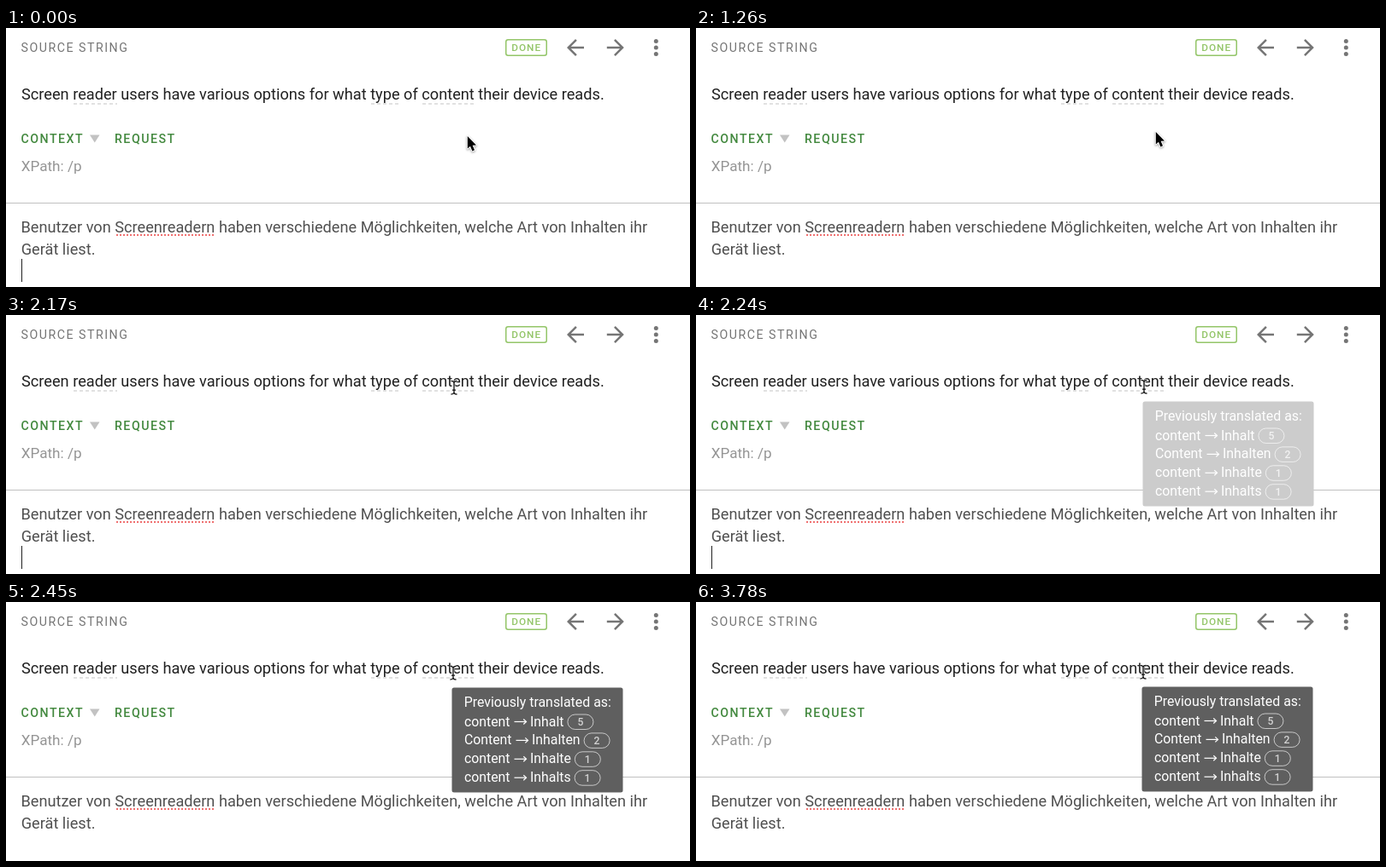
An HTML page with a canvas that plays this animation: 800x304 px, repeating every 3850 ms.

```html
<!DOCTYPE html>
<html lang="en">
<head>
<meta charset="utf-8">
<title>Translation editor</title>
<style>
  html, body { margin: 0; width: 100%; height: 100%; overflow: hidden; background: #fff; }
  canvas { display: block; width: 800px; height: 304px; }
</style>
</head>
<body>
<canvas id="stage"></canvas>
<script>
const W = 800, H = 304, LOOP = 3850, STEP = 70;
const canvas = document.getElementById('stage');
const ctx = canvas.getContext('2d');
const dpr = window.devicePixelRatio || 1;
canvas.width = W * dpr;
canvas.height = H * dpr;

const FAMILY = 'Roboto, "Noto Sans", sans-serif';
const GREEN = '#43893f', LIME = '#93c568', GREY = '#757575';
const back = new Path2D('M20 11H7.83l5.59-5.59L12 4l-8 8 8 8 1.41-1.41L7.83 13H20v-2z');

// Pointer: time, x, y
const track = [
  [0, 539, 126], [1120, 539, 126], [1260, 537, 121], [1820, 528, 97],
  [2030, 525, 89], [2240, 524, 85], [2380, 523, 84], [3710, 523, 84], [3780, 523, 83]
];
const BEAM_FROM = 2030, TIP_FROM = 2170, TIP_FADE = 220;
const BLINK = 530, BLINK_OFFSET = 360;

const tipRows = [
  ['content', 'Inhalt', '5'], ['Content', 'Inhalten', '2'],
  ['content', 'Inhalte', '1'], ['content', 'Inhalts', '1']
];

function text(str, x, y, size, color, weight = 400, spacing = 0) {
  ctx.font = `${weight} ${size}px ${FAMILY}`;
  ctx.letterSpacing = spacing + 'px';
  ctx.fillStyle = color;
  ctx.fillText(str, x, y);
  return x + ctx.measureText(str).width;
}

function line(x1, y1, x2, y2, color, width = 1, dash = []) {
  ctx.strokeStyle = color;
  ctx.lineWidth = width;
  ctx.setLineDash(dash);
  ctx.beginPath();
  ctx.moveTo(x1, y1);
  ctx.lineTo(x2, y2);
  ctx.stroke();
  ctx.setLineDash([]);
}

function roundBox(x, y, w, h, r) {
  ctx.beginPath();
  ctx.roundRect(x, y, w, h, r);
}

function poly(points) {
  ctx.beginPath();
  points.forEach(([x, y]) => ctx.lineTo(x, y));
  ctx.closePath();
}

function arrowIcon(cx, cy, dir) {
  ctx.save();
  ctx.translate(cx, cy);
  ctx.scale(1.25 * dir, 1.25);
  ctx.translate(-12, -12);
  ctx.fillStyle = GREY;
  ctx.fill(back);
  ctx.restore();
}

function drawHeader() {
  text('SOURCE STRING', 17.6, 28, 14.2, GREY, 400, 1.5);
  roundBox(584.75, 13.75, 47.5, 18.5, 2.5);
  ctx.strokeStyle = LIME;
  ctx.lineWidth = 1.5;
  ctx.stroke();
  text('DONE', 591.2, 27, 11.8, LIME, 500, 1);
  arrowIcon(666, 23, 1);
  arrowIcon(712.8, 23, -1);
  ctx.fillStyle = GREY;
  for (const y of [15.5, 23, 30.5]) {
    ctx.beginPath();
    ctx.arc(760.3, y, 2.5, 0, Math.PI * 2);
    ctx.fill();
  }
}

function drawBody() {
  text('Screen reader users have various options for what type of content their device reads.',
    18, 83.5, 18.2, '#212121');
  for (const [a, b] of [[79, 130], [427, 461], [487, 548]])
    line(a, 89, b, 89, '#c4c4c4', 1.2, [4, 3]);

  text('CONTEXT', 17.5, 134.5, 14.2, GREEN, 500, 1.5);
  text('REQUEST', 127, 134.5, 14.2, GREEN, 500, 1.5);
  poly([[98, 125.5], [109.5, 125.5], [103.75, 134.5]]);
  ctx.fillStyle = '#c2c2c2';
  ctx.fill();
  text('XPath: /p', 17.8, 168, 17.1, '#949494');

  line(0, 205.5, W, 205.5, '#c0c0c0');
  text('Benutzer von Screenreadern haben verschiedene Möglichkeiten, welche Art von Inhalten ihr',
    17.5, 239.5, 18.18, '#505050');
  text('Gerät liest.', 17.7, 266, 18.18, '#505050');
  line(129, 243, 244, 243, '#f07070', 2, [2, 2]);
}

function drawTip(x, y, shade) {
  const grey = 255 - 160 * shade;
  ctx.save();
  ctx.translate(x, y);
  roundBox(0, 0, 200, 123, 2.5);
  ctx.fillStyle = `rgb(${grey}, ${grey}, ${grey})`;
  ctx.fill();
  text('Previously translated as:', 14.2, 22.5, 15.9, '#fff');
  tipRows.forEach(([from, to, count], i) => {
    const base = 45 + i * 21.9, mid = base - 5;
    const end = text(from, 14.4, base, 15.85, '#fff');
    const a = end + 5, b = a + 14;
    line(a, mid, b, mid, '#fff', 1.2);
    ctx.beginPath();
    ctx.moveTo(b - 3.2, mid - 3);
    ctx.lineTo(b, mid);
    ctx.lineTo(b - 3.2, mid + 3);
    ctx.stroke();
    const pill = text(to, b + 4.5, base, 15.85, '#fff') + 4.5;
    roundBox(pill, mid - 8.5, 30, 17.5, 8.75);
    ctx.strokeStyle = 'rgba(255,255,255,.65)';
    ctx.lineWidth = 1;
    ctx.stroke();
    text(count, pill + 11.5, mid + 4.7, 12.2, 'rgba(255,255,255,.72)', 500);
  });
  ctx.restore();
}

function drawPointer(x, y) {
  ctx.save();
  ctx.translate(x, y);
  poly([[0.8, 1], [0.8, 15.6], [4, 12.7], [6.4, 18.4], [9, 17.3], [6.6, 11.7], [11, 11.4]]);
  ctx.lineJoin = 'round';
  ctx.lineWidth = 2;
  ctx.strokeStyle = '#fff';
  ctx.shadowColor = 'rgba(0,0,0,.4)';
  ctx.shadowBlur = 2.5 * dpr;
  ctx.shadowOffsetY = dpr;
  ctx.stroke();
  ctx.shadowColor = 'transparent';
  ctx.fillStyle = '#000';
  ctx.fill();
  ctx.restore();
}

function drawBeam(x, y) {
  ctx.save();
  ctx.translate(x, y - 0.8);
  ctx.beginPath();
  for (const s of [-1, 1]) {
    ctx.moveTo(-3.5, 7.8 * s);
    ctx.quadraticCurveTo(0, 7.8 * s, 0, 5.2 * s);
    ctx.quadraticCurveTo(0, 7.8 * s, 3.5, 7.8 * s);
  }
  ctx.moveTo(0, -6);
  ctx.lineTo(0, 6);
  ctx.moveTo(-2, 3);
  ctx.lineTo(2, 3);
  for (const [color, width] of [['rgba(255,255,255,.8)', 3], ['#111', 1.3]]) {
    ctx.strokeStyle = color;
    ctx.lineWidth = width;
    ctx.stroke();
  }
  ctx.restore();
}

function pointerAt(t) {
  let i = 1;
  while (i < track.length - 1 && t > track[i][0]) i++;
  const [t0, x0, y0] = track[i - 1], [t1, x1, y1] = track[i];
  const k = Math.min(1, (t - t0) / (t1 - t0));
  return [x0 + (x1 - x0) * k, y0 + (y1 - y0) * k];
}

function draw(t) {
  ctx.setTransform(dpr, 0, 0, dpr, 0, 0);
  ctx.fillStyle = '#fff';
  ctx.fillRect(0, 0, W, H);
  drawHeader();
  drawBody();
  if (Math.floor((t + BLINK_OFFSET) / BLINK) % 2 === 0) {
    ctx.fillStyle = '#222';
    ctx.fillRect(18, 271, 1, 27);
  }
  const [x, y] = pointerAt(t);
  const shade = Math.min(1, (t - TIP_FROM) / TIP_FADE);
  if (shade > 0) drawTip(Math.round(x) - 1.5, Math.round(y) + 16.5, shade);
  if (t < BEAM_FROM) drawPointer(x, y);
  else drawBeam(Math.round(x), Math.round(y));
}

const start = performance.now();
function frame() {
  const t = (performance.now() - start) % LOOP;
  draw(Math.floor(t / STEP) * STEP);
  requestAnimationFrame(frame);
}
frame();
</script>
</body>
</html>
```
